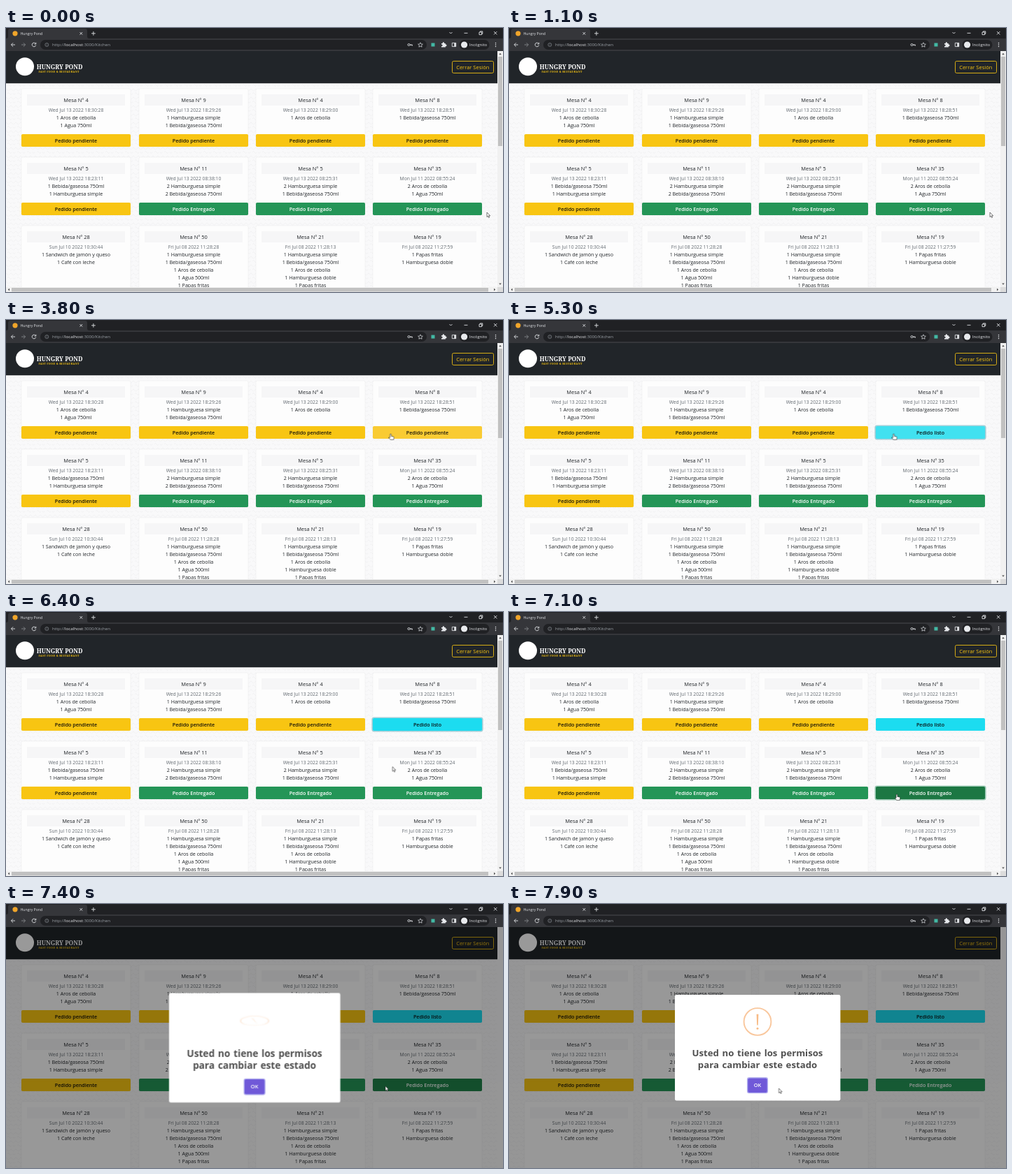
An HTML page that plays this animation: 710x378 px, repeating every 8000 ms.

```html
<!DOCTYPE html>
<html lang="es">
<head>
<meta charset="utf-8">
<title>Kitchen</title>
<style>
html, body { margin: 0; width: 100%; height: 100%; overflow: hidden; background: #f9f9fa; }
svg { display: block; width: 100vw; height: 100vh; font-family: "Open Sans", "Noto Sans", sans-serif; }
.mid { text-anchor: middle; font-weight: 500; }
.line { fill: none; stroke: #dfe1e5; stroke-width: .9; }
.slab { font-family: "Noto Serif", "Liberation Serif", serif; font-weight: 800; }
.anim { animation: 8s linear infinite; }
.swap { animation: 8s step-end infinite; }

#pointer { animation-name: move; }
@keyframes move {
  0%, 31.24% { transform: translate(687px, 264px); }
  31.25% { transform: translate(667px, 240px); }
  37.5%, 73.75% { transform: translate(549.5px, 163px); animation-timing-function: ease-in-out; }
  85%, 91.24% { transform: translate(554px, 261px); }
  91.25% { transform: translate(551.5px, 260.5px); animation-timing-function: ease-in-out; }
  98.75%, 100% { transform: translate(385.5px, 264px); }
}
#arrow { animation-name: arrow; }
@keyframes arrow {
  0%, 76%, 91.25% { opacity: 1; }
  36.9%, 82.6% { opacity: 0; }
}
#hand { animation-name: hand; }
@keyframes hand {
  0%, 76%, 91.25% { opacity: 0; }
  36.9%, 82.6% { opacity: 1; }
}

#ready { animation-name: ready; }
@keyframes ready {
  0%, 36.2% { fill: #f8c512; }
  37.5%, 61.2% { fill: #f9cb33; }
  62.5%, 76% { fill: #41e1f0; }
  77.8%, 100% { fill: #1cdcf0; }
}
#readyRing { animation-name: readyRing; }
@keyframes readyRing {
  0%, 58.7% { stroke-opacity: 0; stroke: #d9a406; }
  60%, 61.2% { stroke-opacity: .5; stroke: #d9a406; }
  62.5%, 86.2% { stroke-opacity: .5; stroke: #4aa6b8; }
  87.5%, 100% { stroke-opacity: 0; stroke: #4aa6b8; }
}
#before { animation-name: before; }
@keyframes before { 0% { opacity: 1; } 61.25% { opacity: 0; } }
#after { animation-name: after; }
@keyframes after { 0% { opacity: 0; } 61.25% { opacity: 1; } }

#served { animation-name: served; }
@keyframes served {
  0%, 82.6% { fill: #249557; }
  84.4%, 91.9% { fill: #1c7743; }
  93.8%, 100% { fill: #249557; }
}
#servedRing { animation-name: servedRing; }
@keyframes servedRing {
  0%, 86.2% { stroke-opacity: 0; }
  87.5%, 90.6% { stroke-opacity: .5; }
  92.5%, 100% { stroke-opacity: 0; }
}

#bars { animation-name: bars; }
@keyframes bars { 0% { opacity: 1; } 91.25% { opacity: 0; } }
#shade { animation-name: shade; }
@keyframes shade {
  0%, 91.24% { fill-opacity: 0; }
  91.25% { fill-opacity: .34; }
  92.5%, 100% { fill-opacity: .4; }
}
#modal { transform-origin: 355px 205.5px; animation-name: modal; }
@keyframes modal {
  0%, 91.24% { opacity: 0; transform: scale(.922); }
  91.25% { opacity: 1; transform: scale(.922); }
  92.31% { transform: scale(1.05); }
  93.63% { transform: scale(.95); }
  94.38%, 100% { opacity: 1; transform: scale(1); }
}
#icon { transform-origin: 355px 168.5px; animation-name: icon; }
@keyframes icon {
  0%, 91.25% { opacity: 0; transform: scaleY(0); animation-timing-function: ease-out; }
  96.88%, 100% { opacity: 1; transform: scaleY(1); }
}
#mark { transform-origin: 355px 168.5px; animation-name: mark; }
@keyframes mark {
  0%, 91.25% { opacity: 0; transform: rotate(45deg); }
  92.19% { opacity: .4; transform: rotate(-25deg); }
  93.75% { opacity: .8; transform: rotate(15deg); }
  95.31% { opacity: 1; transform: rotate(-5deg); }
  96.88%, 100% { opacity: 1; transform: rotate(0deg); }
}
</style>
</head>
<body>
<svg id="stage" viewBox="0 0 710 378" preserveAspectRatio="none"></svg>
<script>
const rect = (x, y, w, h, fill, extra = '') =>
  `<rect x="${x}" y="${y}" width="${w}" height="${h}" fill="${fill}" ${extra}/>`;
const text = (x, y, size, fill, str, extra = '') =>
  `<text x="${x}" y="${y}" font-size="${size}" fill="${fill}" ${extra}>${str}</text>`;
const mid = (x, y, size, fill, str, extra = '') => text(x, y, size, fill, str, `class="mid" ${extra}`);
const line = (d, extra = '') => `<path class="line" d="${d}" ${extra}/>`;

const soda = '1 Bebida/gaseosa 750ml', rings = '1 Aros de cebolla', water = '1 Agua 750ml';
const simple = '1 Hamburguesa simple', double = '1 Hamburguesa doble', fries = '1 Papas fritas';
const two = s => s.replace('1', '2');
const WAIT = 'Pedido pendiente', DONE = 'Pedido Entregado', READY = 'Pedido listo';

// table, date, items, status
const orders = [
  [4, 'Wed Jul 13 2022 18:30:28', [rings, water], WAIT],
  [9, 'Wed Jul 13 2022 18:29:26', [simple, soda], WAIT],
  [4, 'Wed Jul 13 2022 18:29:00', [rings], WAIT],
  [8, 'Wed Jul 13 2022 18:28:51', [soda], READY],
  [5, 'Wed Jul 13 2022 18:23:11', [soda, simple], WAIT],
  [11, 'Wed Jul 13 2022 08:38:10', [two(simple), two(soda)], DONE],
  [5, 'Wed Jul 13 2022 08:25:31', [two(simple), soda], DONE],
  [35, 'Mon Jul 11 2022 08:55:24', [two(rings), water], DONE],
  [28, 'Sun Jul 10 2022 10:30:44', ['1 Sandwich de jamón y queso', '1 Café con leche']],
  [50, 'Fri Jul 08 2022 11:28:28', [simple, soda, rings, '1 Agua 500ml', fries]],
  [21, 'Fri Jul 08 2022 11:28:13', [simple, soda, rings, double, fries]],
  [19, 'Fri Jul 08 2022 11:27:59', [fries, double]]
];

function button(x, y, status, i) {
  const cx = x + 78, box = [x, y, 156, 18];
  const ring = id => rect(x - .7, y - .7, 157.4, 19.4, 'none',
    `id="${id}" class="anim" rx="2.6" stroke="#3c996e" stroke-width="1.8"`);
  const label = (str, fill) => mid(cx, y + 11.7, 7.1, fill, str, 'style="font-weight:600"');
  if (status === READY) return ring('readyRing') +
    rect(...box, '#f8c512', 'id="ready" rx="1.8" class="anim"') +
    `<g id="before" class="swap">${label(WAIT, '#16130a')}</g>` +
    `<g id="after" class="swap">${label(READY, '#0a1416')}</g>`;
  if (status === WAIT) return rect(...box, '#f8c512', 'rx="1.8"') + label(status, '#16130a');
  const last = i === 7;
  return (last ? ring('servedRing') : '') +
    rect(...box, '#249557', last ? 'id="served" class="anim" rx="1.8"' : 'rx="1.8"') + label(status, '#fff');
}

function card([table, date, items, status], i) {
  const x = Math.round(22.3 + (i % 4) * 167.3), y = 87 + Math.floor(i / 4) * 98, cx = x + 78;
  return rect(x, y, 156, status ? 83 : 130, '#fdfdfd', 'rx="2" stroke="#000" stroke-opacity=".03"') +
    rect(x + 8, y + 8, 140, 16, '#f6f6f7') +
    mid(cx, y + 18.8, 7.45, '#212529', `Mesa N° ${table}`) +
    mid(cx, y + 32.8, 6.75, '#636a71', date) +
    items.map((s, n) => mid(cx, y + 43.9 + n * 11.05, 7.1, '#212529', s)).join('') +
    (status ? button(x, y + 65, status, i) : '');
}

const browser = () =>
  rect(0, 0, 710, 33, '#202124') +
  '<path d="M0 15Q3 15 3 12V4Q3 1 6 1H113Q116 1 116 4V12Q116 15 119 15H710V33H0Z" fill="#35363a"/>' +
  '<circle cx="13" cy="7.8" r="3.6" fill="#f0a52a"/>' +
  text(20.5, 9.8, 5.2, '#e4e6e9', 'Hungry Pond') +
  line('M105.5 6l3.6 3.6m0-3.6l-3.6 3.6M122 7.8h5.8m-2.9-2.9v5.8') +
  line('M633.5 6l2 2 2-2M654.5 7.3h5M676 6h3.6v3.6H676zM677.3 6V4.8h3.5v3.5h-1.2M697 5l4.4 4.4m0-4.4L697 9.4', 'stroke-width=".7"') +
  line('M13 24H7.5m2.6-2.7L7.4 24l2.7 2.7M42.4 22.5a2.8 2.8 0 1 0 .3 2.2M42.8 20.8v2.2h-2.2') +
  line('M22 24h5.6m-2.7-2.7l2.7 2.7-2.7 2.7', 'style="stroke:#85878b"') +
  rect(49, 17, 552, 14, '#202124', 'rx="7"') +
  line('M60.8 24a2.5 2.5 0 1 0-5 0a2.5 2.5 0 1 0 5 0M58.3 23.7v1.5M58.3 22.4v.6', 'style="stroke:#9aa0a6;stroke-width:.6"') +
  text(66, 26.3, 6.15, '#9aa0a6', 'http://<tspan fill="#e8eaed">localhost</tspan>:3000/Kitchen') +
  line('M577 24a1.5 1.5 0 1 0-3 0a1.5 1.5 0 1 0 3 0h3.4v1.6M578.7 24v1.2') +
  line('M592 20.8l1 2.2 2.4.2-1.8 1.6.5 2.4-2.1-1.2-2.1 1.2.5-2.4-1.8-1.6 2.4-.2z', 'style="stroke-width:.7"') +
  rect(607.5, 21.5, 5, 5, '#43b9a4') +
  '<path d="M622 22h1.8a1.2 1.2 0 1 1 2.2 0h1.8v1.8a1.2 1.2 0 1 1 0 2.2v1.5H622v-1.7a1.1 1.1 0 1 0 0-2z" fill="#e8eaed"/>' +
  line('M637.3 21.4h5.4v5.2h-5.4z') + rect(640.3, 21.4, 2.4, 5.2, '#e8eaed') +
  rect(647.5, 17, 43, 14, '#202124', 'rx="7"') +
  '<circle cx="654.6" cy="24" r="4.6" fill="#e8eaed"/>' +
  text(662, 26.1, 5.8, '#e8eaed', 'Incógnito') +
  [21.6, 24, 26.4].map(y => `<circle cx="699.5" cy="${y}" r=".75" fill="#e8eaed"/>`).join('');

const header = () =>
  rect(0, 79, 702, 1, '#000', 'opacity=".2"') + rect(0, 33, 702, 46, '#212529') +
  '<circle cx="27" cy="55.3" r="13" fill="#fff"/>' +
  text(43.8, 58.9, 8.5, '#fff', 'HUNGRY POND', 'class="slab"') +
  text(46.5, 63.6, 3.7, '#f8c512', 'FAST FOOD &amp; RESTAURANT', 'class="slab" letter-spacing=".3"') +
  rect(637.5, 47.5, 59, 17, 'none', 'rx="2" stroke="#e9ba14" stroke-width=".9"') +
  mid(666.8, 59, 7.55, '#f8c512', 'Cerrar Sesión');

const bars = () => '<g id="bars" class="swap">' +
  rect(702, 33, 8, 345, '#f1f1f1') + rect(0, 371, 710, 7, '#f1f1f1') + rect(702, 371, 8, 7, '#dcdcdc') +
  rect(703, 41, 6, 128, '#c1c1c1') + rect(8, 372, 681, 5.5, '#c1c1c1') +
  '<path d="M704.2 38.2l1.8-2.4 1.8 2.4zM704.2 365.4l1.8 2.4 1.8-2.4zM5 372.8l-2.2 1.8 2.2 1.8zM697 372.8l2.2 1.8-2.2 1.8z" fill="#555"/></g>';

const modal = () => '<g id="modal" class="anim">' +
  rect(237, 130, 236.4, 151.6, '#fff', 'rx="2.3"') +
  '<g id="icon" class="anim"><circle cx="355" cy="168.5" r="19.4" fill="none" stroke="#f9c79d" stroke-width="1.9"/>' +
  '<g id="mark" class="anim" fill="#f8bb86"><path d="M353.6 157.8h2.8l-.6 15.6h-1.6z"/><circle cx="355" cy="178.2" r="1.5"/></g></g>' +
  ['Usted no tiene los permisos', 'para cambiar este estado'].map((s, i) =>
    mid(355, 218.2 + i * 16.6, 13.2, '#505050', s, 'style="font-weight:700" word-spacing="1.2"')).join('') +
  rect(341.2, 249.4, 27.6, 20.6, '#7059d8', 'rx="2" stroke="#7066e0" stroke-opacity=".5" stroke-width="2.6"') +
  mid(355, 262.4, 7.4, '#fff', 'OK', 'style="font-weight:600"') + '</g>';

const pointer = () => '<g id="pointer" class="anim" stroke="#222" stroke-width=".6" stroke-linejoin="round" fill="#fff">' +
  '<path id="arrow" class="swap" d="M0 0V6.6L1.5 5.2 2.6 7.6 3.6 7.1 2.6 4.8H4.7Z"/>' +
  '<path id="hand" class="swap" d="M0 0Q.9 0 .9 1V3.4L3.9 4Q4.9 4.3 4.8 5.3L4.2 8.6H-.2L-2.6 5.4Q-2.4 4.4-.9 5.4V1Q-.9 0 0 0Z"/></g>';

document.getElementById('stage').innerHTML =
  '<defs><pattern id="doodle" width="14" height="12" patternUnits="userSpaceOnUse">' +
  '<path d="M0 3l3.5 3L7 3l3.5 3L14 3M2 10q1.5-3 3 0t3 0M10 9.5a1.5 1.5 0 1 0 3 0" fill="none" stroke="#eeeeef" stroke-width=".7"/></pattern></defs>' +
  rect(0, 33, 710, 345, '#f9f9fa') + rect(0, 79, 702, 299, 'url(#doodle)') +
  orders.map(card).join('') + header() + bars() +
  rect(0, 33, 710, 345, '#000', 'id="shade" class="anim"') +
  browser() + modal() + pointer();
</script>
</body>
</html>
```
